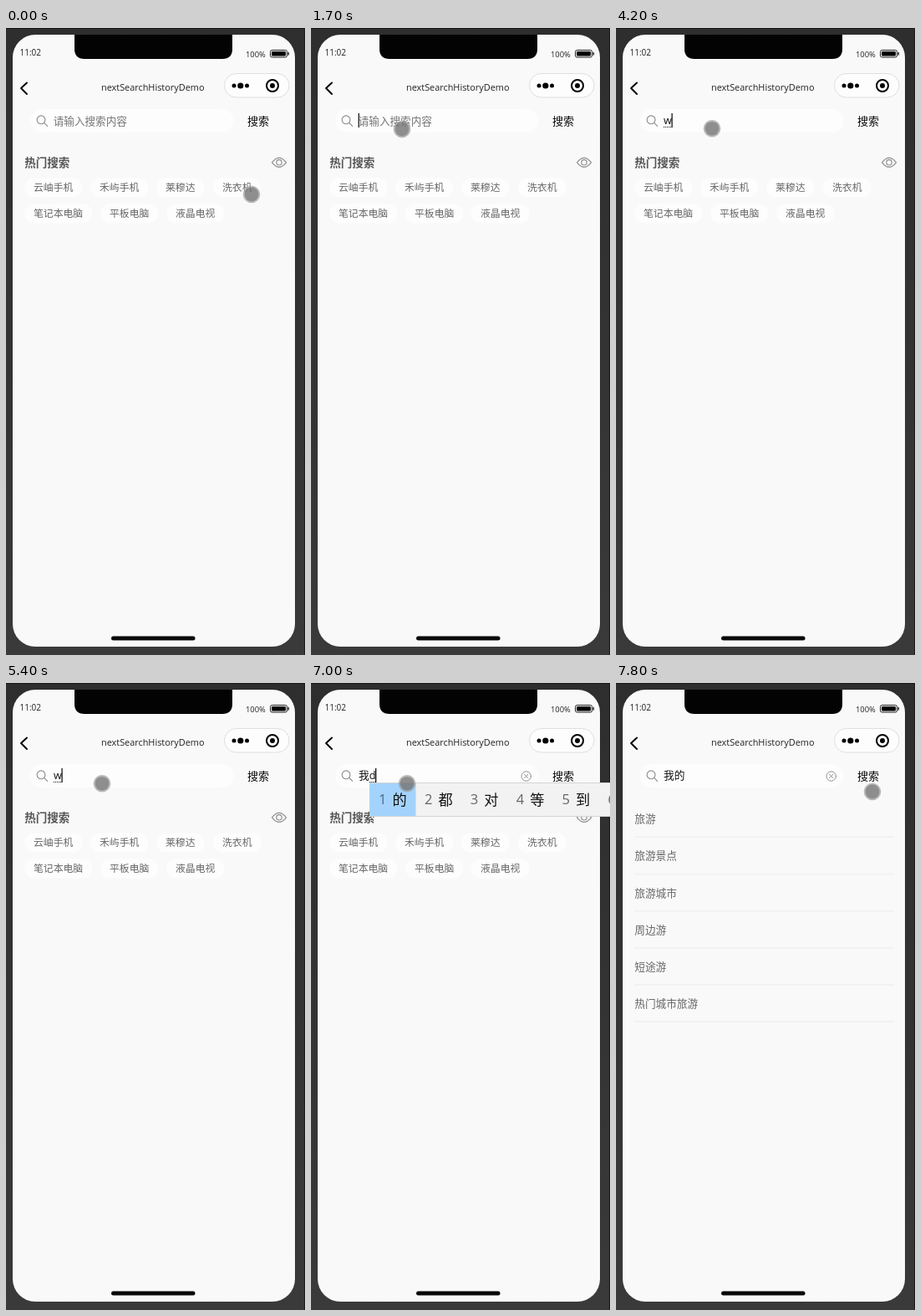
Write an HTML page that moves like this. It is 358 by 750 pixels and loops after 8 s.

```html
<!DOCTYPE html>
<html lang="zh-CN">
<head>
<meta charset="utf-8">
<title>Search demo</title>
<style>
  html, body { margin: 0; width: 100%; height: 100%; overflow: hidden; background: #303030; }
  svg { display: block; width: 358px; height: 750px; }
  text { font-family: "Open Sans", "Noto Sans CJK SC", "Noto Sans CJK", sans-serif; white-space: pre; }
  .line { fill: none; stroke-linecap: round; stroke-linejoin: round; }
</style>
</head>
<body>
<svg viewBox="0 0 358 750">
  <defs>
    <linearGradient id="shell" x2="0" y2="1">
      <stop offset="0" stop-color="#2e2e2e"/>
      <stop offset=".5" stop-color="#333"/>
      <stop offset="1" stop-color="#3a3a3a"/>
    </linearGradient>
  </defs>
  <rect width="358" height="750" fill="url(#shell)"/>
  <path d="M0 .5H358M357.5 0V750" stroke="#161616"/>
  <rect x="8" y="8" width="338" height="732" rx="27" fill="#f9f9f9"/>
  <path d="M82 8H271V25Q271 37 259 37H94Q82 37 82 25Z" fill="#030303"/>
  <rect x="126" y="727.5" width="100.5" height="5" rx="2.5" fill="#080808"/>

  <text x="16.5" y="33.2" font-size="10" fill="#222">11:02</text>
  <text x="287" y="35" font-size="9.4" fill="#222">100%</text>
  <rect x="316.5" y="26.5" width="20" height="8.5" rx="2" fill="none" stroke="#222"/>
  <rect x="318" y="28" width="17" height="5.5" rx="1" fill="#000"/>
  <path d="M338.3 29v3.6" stroke="#222" stroke-width="1.4"/>

  <path class="line" d="M25 65.5L18 72L25 79" stroke="#000" stroke-width="1.9"/>
  <text x="114" y="75" font-size="10.9" fill="#222">nextSearchHistoryDemo</text>
  <rect x="261.5" y="54.5" width="77.5" height="28.5" rx="14.2" fill="#fdfdfd" stroke="#dedede"/>
  <g fill="#000">
    <circle cx="273" cy="69" r="2.5"/><circle cx="280.8" cy="69" r="3.6"/><circle cx="288.5" cy="69" r="2.5"/>
    <circle cx="319" cy="69" r="3"/>
  </g>
  <circle cx="319" cy="69" r="7" fill="none" stroke="#000" stroke-width="2"/>

  <rect x="29" y="97" width="243.5" height="28" rx="14" fill="#fdfdfd"/>
  <g class="line" stroke="#8a8a8a" stroke-width="1.1">
    <circle cx="42" cy="109.8" r="4.9"/><path d="M45.6 113.4L49.6 117.4"/>
  </g>
  <text x="289" y="116.2" font-size="13" fill="#0a0a0a">搜索</text>
  <text id="hint" x="56.7" y="115.6" font-size="12.6" fill="#757575">请输入搜索内容</text>
  <text id="value" x="57" y="115.4" font-size="12.7" fill="#111"></text>
  <path id="under" stroke="#111" stroke-dasharray="1 1"/>
  <path id="caret" stroke="#000" stroke-width="1.2"/>
  <g id="clear" class="line" stroke="#8f8f8f">
    <circle cx="257.7" cy="111.5" r="5.7"/><path d="M255.5 109.3l4.4 4.4m0 -4.4l-4.4 4.4"/>
  </g>

  <g id="hot">
    <text x="22.3" y="166.4" font-size="13.5" font-weight="700" fill="#555">热门搜索</text>
    <g class="line" stroke="#8f8f8f" stroke-width="1.2">
      <path d="M318.5 160.8Q327 149.8 335.5 160.8Q327 171.8 318.5 160.8Z"/><circle cx="327" cy="160.8" r="3.2"/>
    </g>
  </g>
  <g id="list"></g>
  <g id="ime"></g>
  <g id="touch">
    <circle r="9.3" fill="none" stroke="#a0a0a0" stroke-width="2" opacity=".75"/>
    <circle r="8.4" fill="#757575" opacity=".82"/>
  </g>
</svg>
<script>
const LOOP = 8000, STEP = 100, LEFT = 57;
const $ = id => document.getElementById(id);

function add(parent, tag, attrs, text) {
  const el = document.createElementNS("http://www.w3.org/2000/svg", tag);
  for (const k in attrs) el.setAttribute(k, attrs[k]);
  if (text) el.textContent = text;
  parent.append(el);
  return el;
}
const show = (id, on) => $(id).setAttribute("visibility", on ? "visible" : "hidden");

// Hot search tags: label, text x, row centre
[["云岫手机", 33, 191], ["禾屿手机", 112, 191], ["莱穆达", 191, 191], ["洗衣机", 259, 191],
 ["笔记本电脑", 33, 222], ["平板电脑", 124, 222], ["液晶电视", 203, 222]].forEach(([label, x, y]) => {
  add($("hot"), "rect", { x: x - 11, y: y - 11.5, width: label.length * 11.85 + 22, height: 23, rx: 11.5, fill: "#fdfdfd" });
  add($("hot"), "text", { x, y: y + 4.4, "font-size": 11.85, fill: "#666" }, label);
});

["旅游", "旅游景点", "旅游城市", "周边游", "短途游", "热门城市旅游"].forEach((label, i) => {
  const y = 162.3 + i * 44.2;
  add($("list"), "text", { x: 22.3, y: y + 4.8, "font-size": 12.65, fill: "#666" }, label);
  add($("list"), "path", { d: `M22 ${y + 22}H333`, stroke: "#f0f0f0", "stroke-width": 1.5 });
});

// Input method candidates
const words = { wo: "我喔沃窝握卧", d: "的都对等到大" };
add($("ime"), "rect", { x: .5, y: 119.5, width: 400, height: 40, fill: "#f2f2f2", stroke: "#d4d4d4" });
add($("ime"), "rect", { x: 0, y: 120, width: 55.5, height: 39, fill: "#a3d3fc" });
const picks = [0, 1, 2, 3, 4, 5].map(i => {
  const x = 11 + i * 54.9;
  add($("ime"), "text", { x, y: 145.3, "font-size": 16.5, fill: i ? "#666" : "#4b6a85" }, String(i + 1));
  return add($("ime"), "text", { x: x + 16.5, y: 146, "font-size": 17.2, fill: "#111" });
});

// Input states: start, committed, composing, caret, clear icon, candidates
const states = [
  [0, "", "", 0, 0, ""],
  [1600, "", "", 1, 0, ""],
  [2100, "", "", 0, 0, ""],
  [2600, "", "", 1, 0, ""],
  [3000, "w", "", 1, 0, ""],
  [3100, "wo", "", 1, 0, ""],
  [3200, "wo", "", 1, 1, ""],
  [3600, "w", "", 1, 1, ""],
  [3700, "", "", 1, 1, ""],
  [3800, "", "", 1, 0, ""],
  [4200, "", "w", 1, 0, ""],
  [4300, "", "wo", 1, 0, ""],
  [4900, "", "wo", 0, 0, ""],
  [5200, "", "w", 0, 0, ""],
  [5400, "", "w", 1, 0, ""],
  [5700, "", "", 1, 0, ""],
  [5900, "", "w", 1, 0, ""],
  [6000, "", "wo", 1, 0, ""],
  [6100, "", "wo", 1, 0, "wo"],
  [6700, "我", "", 1, 0, ""],
  [6800, "我", "", 1, 1, ""],
  [6900, "我", "d", 1, 1, ""],
  [7000, "我", "d", 1, 1, "d"],
  [7100, "我的", "", 1, 1, ""],
  [7700, "我的", "", 0, 1, ""]
];

// Pointer path: time, x, y
const path = [
  [0, 294, 199], [900, 104, 126], [1200, 104, 126], [1300, 104, 123.5], [1600, 104, 123],
  [1700, 109, 121], [1800, 113.5, 120.5], [1900, 115, 120.3], [7400, 115, 120.3], [7700, 307, 130]
];
const smooth = u => u * u * (3 - 2 * u);

function pointAt(t) {
  const i = path.findIndex(p => p[0] > t);
  if (i < 0) return path[path.length - 1].slice(1);
  const [a, b] = [path[i - 1], path[i]];
  const u = smooth((t - a[0]) / (b[0] - a[0]));
  return [1, 2].map(k => a[k] + (b[k] - a[k]) * u);
}

function widthOf(text) {
  $("value").textContent = text;
  return text ? $("value").getComputedTextLength() : 0;
}

function draw(time) {
  const t = Math.floor(time / STEP) * STEP;
  const [, done, typing, caret, clear, ime] = states.filter(s => s[0] <= t).pop();
  const start = LEFT + widthOf(done), end = LEFT + widthOf(done + typing);

  show("hint", !(done + typing));
  show("caret", caret);
  $("caret").setAttribute("d", `M${end + .2} 102V119`);
  show("under", typing);
  $("under").setAttribute("d", `M${start} 118.5H${end}`);
  show("clear", clear);

  show("ime", ime);
  if (ime) {
    $("ime").setAttribute("transform", `translate(${Math.round(start)} 0)`);
    picks.forEach((p, i) => p.textContent = words[ime][i]);
  }

  show("hot", t < 7800);
  show("list", t >= 7800);
  $("touch").setAttribute("transform", `translate(${pointAt(t)})`);
}

const origin = performance.now();
function tick() {
  draw((performance.now() - origin) % LOOP);
  requestAnimationFrame(tick);
}
tick();
</script>
</body>
</html>
```
